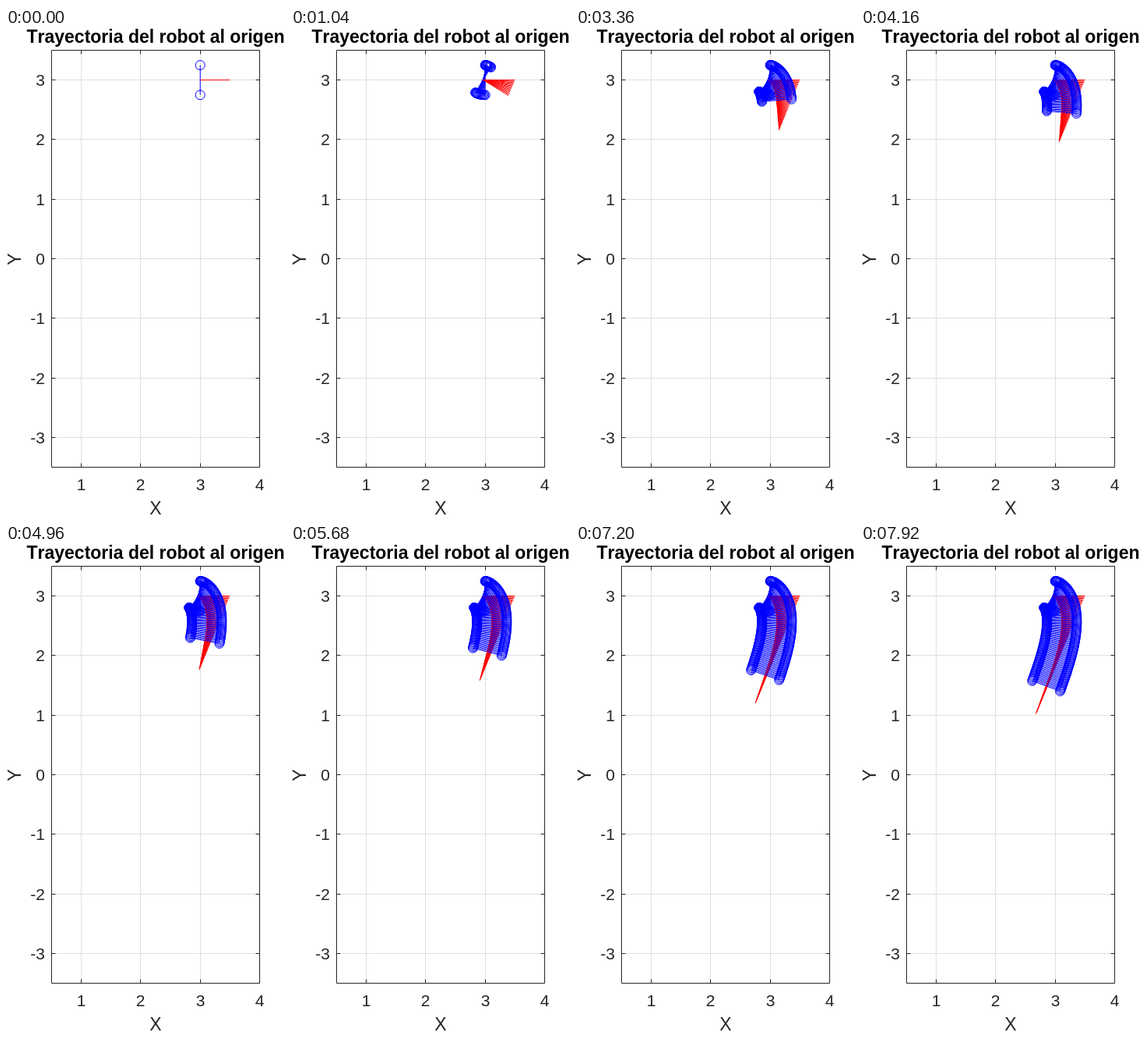
Animation, 358 px wide and 625 px high, one loop 8 s. Source, as an HTML page:

```html
<!DOCTYPE html>
<html lang="es">
<head>
<meta charset="utf-8">
<title>Trayectoria</title>
<style>
  html, body { margin: 0; width: 100%; height: 100%; overflow: hidden; background: #fff; }
  svg { display: block; width: 358px; height: 625px; }
  text { font-family: "Liberation Sans", Arial, sans-serif; font-kerning: none; fill: #262626; }
  .tick { font-size: 21px; }
  .label { font-size: 23px; text-anchor: middle; }
  .title { font-size: 23px; font-weight: bold; text-anchor: middle; fill: #000; }
  .grid { stroke: #dfdfdf; }
  .axis { stroke: #262626; fill: none; }
  .wheels { stroke: #00f; fill: none; }
  .heading { stroke: #f00; fill: none; }
</style>
</head>
<body>
<svg id="stage" viewBox="0 0 358 625"></svg>
<script>
const stage = document.getElementById('stage');
const STEP = 80, COUNT = 100;
const LEFT = 58.5, RIGHT = 325.5, TOP = 28.5, BOTTOM = 562.5;
const UNIT = (RIGHT - LEFT) / 3.5;

const px = x => LEFT + (x - 0.5) * UNIT;
const py = y => TOP + (3.5 - y) * UNIT;
const crisp = v => Math.floor(v) + 0.5;

function add(parent, tag, attrs, text) {
  const node = document.createElementNS('http://www.w3.org/2000/svg', tag);
  for (const key in attrs) node.setAttribute(key, attrs[key]);
  if (text !== undefined) node.textContent = text;
  parent.appendChild(node);
  return node;
}

function drawAxes() {
  let grid = '', axis = `M${LEFT} ${TOP}H${RIGHT}V${BOTTOM}H${LEFT}Z`;
  for (let x = 1; x <= 4; x++) {
    const at = crisp(px(x));
    if (x < 4) grid += `M${at} ${TOP}V${BOTTOM}`;
    axis += `M${at} ${BOTTOM}v-5M${at} ${TOP}v5`;
    add(stage, 'text', { class: 'tick', x: at, y: 592, 'text-anchor': 'middle' }, x);
  }
  for (let y = -3; y <= 3; y++) {
    const at = crisp(py(y));
    grid += `M${LEFT} ${at}H${RIGHT}`;
    axis += `M${LEFT} ${at}h5M${RIGHT} ${at}h-5`;
    add(stage, 'text', { class: 'tick', x: 50, y: at + 7.5, 'text-anchor': 'end' }, y);
  }
  add(stage, 'path', { class: 'grid', d: grid });
  add(stage, 'path', { class: 'axis', d: axis });
  add(stage, 'text', { class: 'title', x: 192, y: 19 }, 'Trayectoria del robot al origen');
  add(stage, 'text', { class: 'label', x: 192, y: 623 }, 'X');
  add(stage, 'text', { class: 'label', transform: 'translate(19 296) rotate(-90)' }, 'Y');
}

// The nose is pulled along a straight line; the body trails it as a tractrix.
const NOSE = 0.5, HALF_AXLE = 0.25;
const VX = -2.5 / 300, VY = -6 / 300;
const COURSE = Math.atan2(VY, VX), SPEED = Math.hypot(VX, VY);

function pose(n) {
  const lag = 2 * Math.atan(Math.tan(COURSE / 2) * Math.exp(-SPEED * n / NOSE));
  const angle = COURSE - lag;
  const cos = Math.cos(angle), sin = Math.sin(angle);
  const tip = [3.5 + VX * n, 3 + VY * n];
  const mid = [tip[0] - NOSE * cos, tip[1] - NOSE * sin];
  const wheel = side => [mid[0] - side * HALF_AXLE * sin, mid[1] + side * HALF_AXLE * cos];
  return { tip, mid, wheels: [wheel(1), wheel(-1)] };
}

const point = p => px(p[0]).toFixed(2) + ' ' + py(p[1]).toFixed(2);
const ring = p => `M${point(p)}m-6 0a6 6 0 1 0 12 0a6 6 0 1 0 -12 0`;

function drawRobot(n) {
  const { tip, mid, wheels: [a, b] } = pose(n);
  const group = add(stage, 'g', { display: 'none' });
  add(group, 'path', { class: 'wheels', d: `M${point(a)}L${point(b)}${ring(a)}${ring(b)}` });
  add(group, 'path', { class: 'heading', d: `M${point(mid)}L${point(tip)}` });
  return group;
}

drawAxes();
const robots = Array.from({ length: COUNT }, (_, n) => drawRobot(n));
const start = performance.now();
let shown = -1;

function show(last) {
  if (last === shown) return;
  robots.forEach((g, n) => g.setAttribute('display', n <= last ? 'inline' : 'none'));
  shown = last;
}

function tick() {
  const time = Math.max(0, performance.now() - start);
  show(Math.floor(time / STEP) % COUNT);
  requestAnimationFrame(tick);
}
tick();
</script>
</body>
</html>
```
